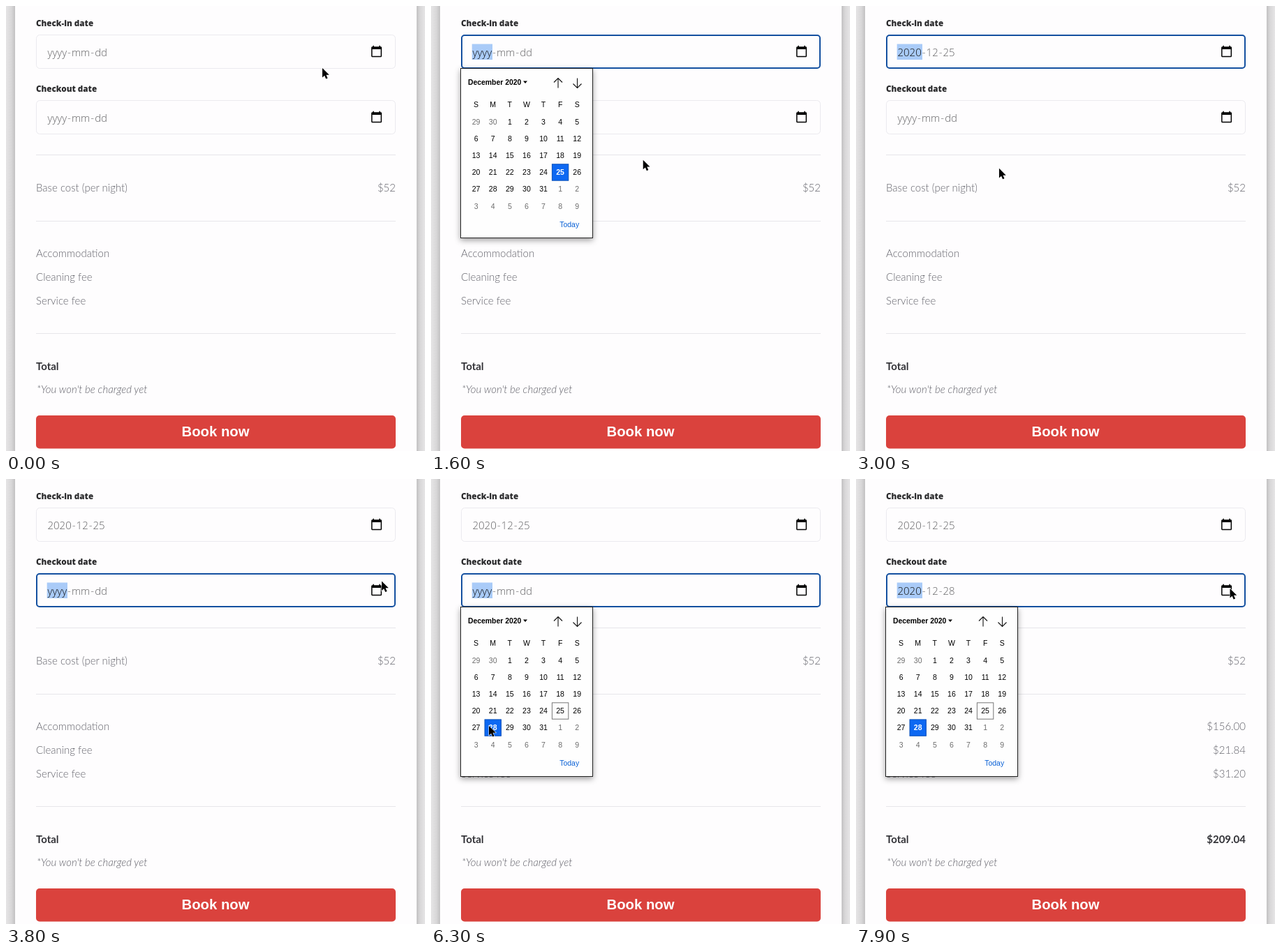
Animation, 600 px wide and 638 px high, one loop 8 s. Source, as an HTML page:

```html
<!DOCTYPE html>
<html lang="en">
<head>
<meta charset="utf-8">
<title>Booking form</title>
<style>
  html, body { margin: 0; width: 100%; height: 100%; overflow: hidden; background: #fefdfe; }
  svg { display: block; }
  text { font: 300 15px Lato, sans-serif; fill: #62626a; white-space: pre; }
  .label { font: 800 11.65px "Open Sans", sans-serif; fill: #2c2c2e; }
  .strong { font-weight: 700; fill: #333338; }
  .note { font-style: italic; }
  .end { text-anchor: end; }
  .button { font: 700 20.3px "Liberation Sans", Arial, sans-serif; fill: #fff; text-anchor: middle; }
  .date { font: 300 15px "Open Sans", sans-serif; fill: #626264; }
  .active { fill: #111; }
  .box { fill: none; stroke: #ebeaef; }
  .box.focus { stroke: #1450a0; stroke-width: 2; }
  .rule { stroke: #e7e6ea; }
  #popup text { font: 400 10.5px "Liberation Sans", Arial, sans-serif; fill: #000; text-anchor: middle; }
  #popup .title { font-weight: 700; font-size: 10.4px; text-anchor: start; }
  #popup .link { fill: #0b62d6; }
  #popup .outside { fill: #6c6c6c; }
  #popup .chosen { fill: #fff; font-weight: 700; }
  .sheet { fill: #fefefe; stroke: #222; filter: drop-shadow(0 3px 4px rgba(0, 0, 0, .38)); }
  .arrow { fill: none; stroke: #111; stroke-width: 1.1; }
</style>
</head>
<body>
<svg width="600" height="638" viewBox="0 0 600 638">
  <defs>
    <linearGradient id="shade">
      <stop stop-color="#e6e5e6"/>
      <stop offset=".6" stop-color="#d8d7d8"/>
      <stop offset="1" stop-color="#c2c1c2"/>
    </linearGradient>
    <path id="icon" d="M20 3h-1V1h-2v2H7V1H5v2H4c-1.1 0-2 .9-2 2v16c0 1.1.9 2 2 2h16c1.1 0 2-.9 2-2V5c0-1.1-.9-2-2-2zm0 18H4V8h16v13z"/>
  </defs>
  <rect width="600" height="638" fill="#fefdfe"/>
  <rect width="13" height="638" fill="url(#shade)"/>
  <rect width="12" height="638" fill="url(#shade)" transform="matrix(-1 0 0 1 600 0)"/>
  <g id="form"></g>
  <g id="fields"></g>
  <g id="popup"></g>
  <path id="cursor" d="M0 0V13.6L3.1 10.8 5.2 15.5 7.6 14.4 5.5 9.8H9.8Z" stroke="#fff" stroke-width="1.1" paint-order="stroke"/>
</svg>
<script>
const $ = id => document.getElementById(id);
const text = (x, y, s, cls = '') => `<text x="${x}" y="${y}" class="${cls}">${s}</text>`;
const rect = (x, y, w, h, attrs) => `<rect x="${x}" y="${y}" width="${w}" height="${h}" ${attrs}/>`;

const LOOP = 8000, FIELD_STEP = 94;
const CELL = 24.1, CELL_X = 64.6, CELL_Y = 166.2;
const TODAY = 25;

// [time, x, y]
const PATH = [
  [0, 453, 89], [600, 529, 63], [950, 529, 63], [2000, 196, 296], [2300, 191.5, 291],
  [2750, 185, 238], [2900, 185, 238], [3600, 538, 146.5], [3800, 538, 146.5],
  [4500, 530, 160], [4800, 529, 160], [5000, 522.5, 161], [6150, 83, 354],
  [6700, 83, 354], [7600, 535.5, 157]
];
// Open, fill and close times of the calendar, with the field it belongs to
const POPUPS = [
  [680, 880, 2900, 0],
  [4680, 4880, 6380, 1],
  [7680, 7880, LOOP, 1]
];

function cursorAt(t) {
  const next = PATH.findIndex(p => p[0] > t);
  if (next < 0) return PATH.at(-1).slice(1);
  const [a, b] = [PATH[next - 1], PATH[next]];
  const u = (t - a[0]) / (b[0] - a[0]), e = u * u * (3 - 2 * u);
  return [1, 2].map(i => a[i] + (b[i] - a[i]) * e);
}

function form(priced) {
  const price = (y, s, cls = '') => priced ? text(558, y, s, 'end ' + cls) : '';
  return text(43, 29, 'Check-in date', 'label') + text(43, 123, 'Checkout date', 'label')
    + [213.5, 308.5, 469.5].map(y => `<path class="rule" d="M43 ${y}H558"/>`).join('')
    + text(43, 266, 'Base cost (per night)') + text(558, 266, '$52', 'end')
    + text(43, 360, 'Accommodation') + price(360, '$156.00')
    + text(43, 394, 'Cleaning fee') + price(394, '$21.84')
    + text(43, 427.5, 'Service fee') + price(427.5, '$31.20')
    + text(43, 521.5, 'Total', 'strong') + price(521.5, '$209.04', 'strong')
    + text(44, 555, "*You won't be charged yet", 'note')
    + rect(43, 587, 515, 47.5, 'rx="5" fill="#da423d"')
    + text(300, 617, 'Book now', 'button');
}

function field(index, value, focused) {
  const [year, month, day] = (value || 'yyyy-mm-dd').split('-');
  const box = focused ? rect(44, 42, 513, 47, 'rx="4" class="box focus"')
    + rect(58.7, 54.5, value ? 36.3 : 29.3, 22.5, 'fill="#a9cbf8"')
    : rect(43.5, 41.5, 514, 48, 'rx="5" class="box"');
  return `<g transform="translate(0 ${index * FIELD_STEP})">${box}
    <text x="59.5" y="71.5" class="date"><tspan class="${focused ? 'active' : ''}">${year}</tspan><tspan
    dx="1">-</tspan><tspan dx="1">${month}</tspan><tspan dx="1">-</tspan><tspan dx="1">${day}</tspan></text>
    <use href="#icon" transform="translate(521.6 56) scale(.75)"/></g>`;
}

function calendar(chosen, hover) {
  let out = text(53, 113, 'December 2020', 'title') + '<path d="M132 107.5h6l-3 3.4z"/>'
    + '<path class="arrow" d="M182 117.5V103.5M176 109.5l6-6 6 6M209.5 103.5V117.5M203.5 111.5l6 6 6-6"/>'
    + text(198.2, 317, 'Today', 'link');
  [...'SMTWTFS'].forEach((d, i) => out += text(CELL_X + i * CELL, 145, d));
  for (let i = 0; i < 42; i++) {
    const x = CELL_X + i % 7 * CELL, y = CELL_Y + Math.floor(i / 7) * CELL;
    const date = new Date(2020, 10, 29 + i), day = date.getDate(), inside = date.getMonth() === 11;
    const isChosen = inside && day === chosen;
    const cell = (size, style) => rect(x - size / 2, y - size / 2, size, size, style);
    if (isChosen) out += cell(23.4, 'fill="#0d68f2" stroke="#0b50b8"');
    else if (i === hover) out += cell(24, 'fill="#a9cbf8"');
    if (inside && day === TODAY && !isChosen) out += cell(23.4, 'fill="none" stroke="#777"');
    out += text(x, y + 3.8, day, isChosen ? 'chosen' : inside ? '' : 'outside');
  }
  return out;
}

function popup(t, [x, y]) {
  const open = POPUPS.find(([from, , to]) => t >= from && t < to);
  if (!open) return '';
  const shift = open[3] * FIELD_STEP;
  const col = Math.round((x - CELL_X) / CELL), row = Math.round((y - shift - CELL_Y) / CELL);
  const hover = col >= 0 && col < 7 && row >= 0 && row < 6 ? row * 7 + col : -1;
  return `<g transform="translate(0 ${shift})">${rect(42.5, 89.5, 189, 243, 'class="sheet"')}
    ${t >= open[1] ? calendar(t >= 6250 ? 28 : TODAY, hover) : ''}</g>`;
}

const shown = {};
function update(id, markup) {
  if (shown[id] !== markup) $(id).innerHTML = shown[id] = markup;
}

function draw() {
  const t = performance.now() % LOOP, pos = cursorAt(t);
  const focus = t < 620 ? -1 : t < 3780 ? 0 : 1;
  update('form', form(t >= 6380));
  update('fields', field(0, t >= 2900 && '2020-12-25', focus === 0)
    + field(1, t >= 6380 && '2020-12-28', focus === 1));
  update('popup', popup(t, pos));
  $('cursor').setAttribute('transform', `translate(${pos})`);
  requestAnimationFrame(draw);
}
draw();
</script>
</body>
</html>
```
